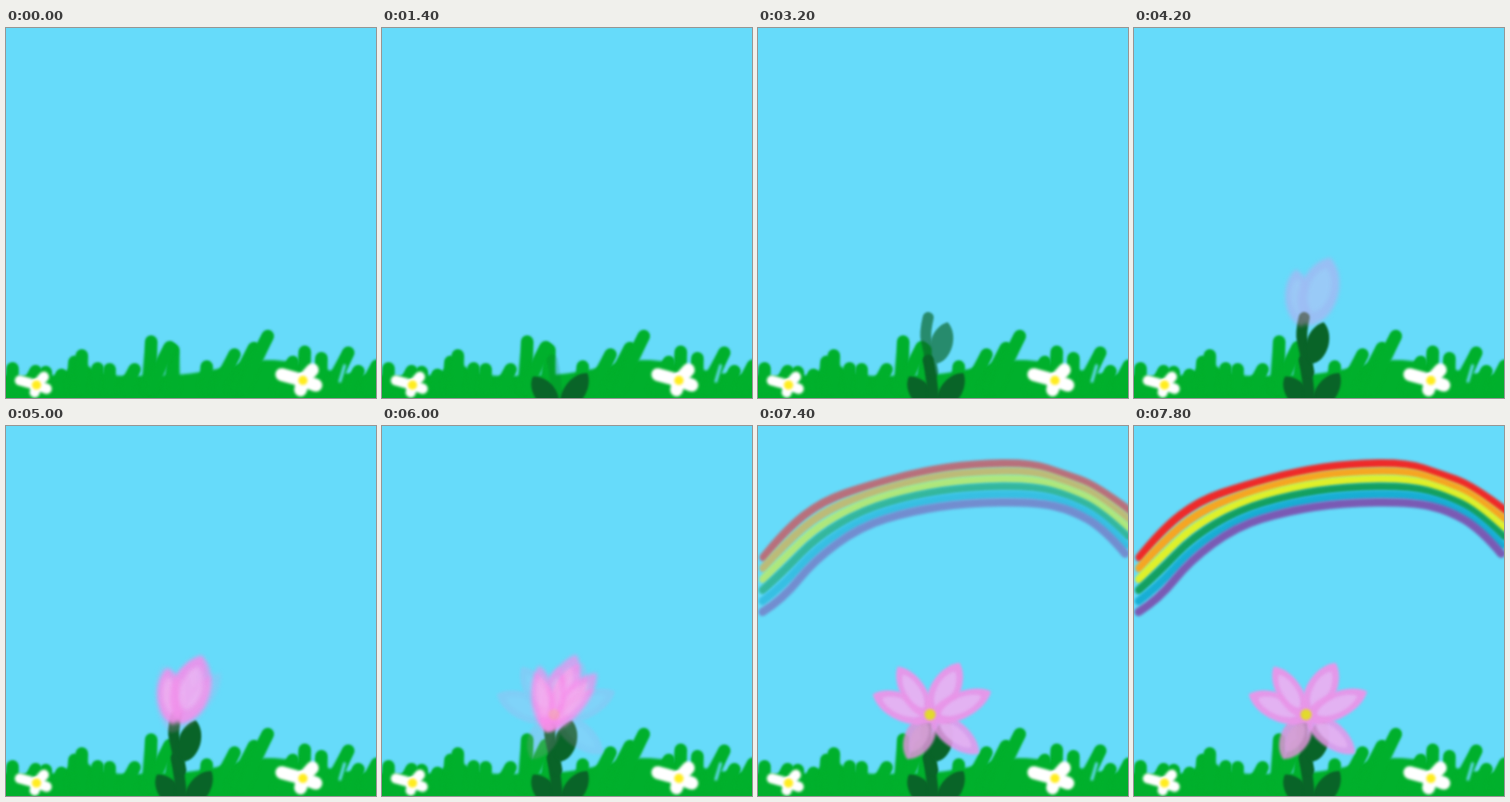
An HTML page with a canvas for the animation above (8000 ms loop, 400 px wide and 400 px high).

```html
<!DOCTYPE html>
<html lang="en">
<head>
<meta charset="utf-8">
<title>Growing flower</title>
<style>
  html, body { margin: 0; width: 100%; height: 100%; overflow: hidden; background: #66dbfa; }
  canvas { display: block; width: 100vw; height: 100vh; }
</style>
</head>
<body>
<canvas id="stage" width="400" height="400"></canvas>
<script>
const SIZE = 400, LOOP = 8000, STEP = 200;
const SKY = '#66dbfa', GRASS = '#00b02c', DARK = '#096428';
const PINK = '#e996e9', PALE = '#e4b3f3';
const ctx = document.getElementById('stage').getContext('2d');

// A transparent layer painted once with a soft brush.
function layer(paint, blur = 1.7) {
  const canvas = document.createElement('canvas');
  canvas.width = canvas.height = SIZE;
  const g = canvas.getContext('2d');
  g.filter = `blur(${blur}px)`;
  g.lineCap = g.lineJoin = 'round';
  paint(g);
  return canvas;
}

const lerp = (a, b, k) => a + (b - a) * k;
const mix = (a, b, k) => [lerp(a[0], b[0], k), lerp(a[1], b[1], k)];
const bell = (x, center, spread) => Math.exp(-(((x - center) / spread) ** 2));

// A smooth stroke guided by its points.
function brush(g, color, width, points) {
  const last = points.length - 1;
  g.beginPath();
  g.moveTo(...points[0]);
  for (let i = 1; i < last; i++) {
    g.quadraticCurveTo(...points[i], ...mix(points[i], points[i + 1], i === last - 1 ? 1 : 0.5));
  }
  g.lineTo(...points[last]);
  g.strokeStyle = color;
  g.lineWidth = width;
  g.stroke();
}

function dot(g, color, x, y, r) {
  g.beginPath();
  g.arc(x, y, r, 0, Math.PI * 2);
  g.fillStyle = color;
  g.fill();
}

// A leaf from root to tip, widest past its middle.
function leaf(g, color, root, tip, width) {
  const dx = tip[0] - root[0], dy = tip[1] - root[1];
  const swell = width * 2 / 3 / Math.hypot(dx, dy);
  const side = (k, s) => [root[0] + dx * k - dy * s, root[1] + dy * k + dx * s];
  g.beginPath();
  g.moveTo(...root);
  g.bezierCurveTo(...side(0.15, swell), ...side(0.8, swell), ...tip);
  g.bezierCurveTo(...side(0.8, -swell), ...side(0.15, -swell), ...root);
  g.fillStyle = color;
  g.fill();
}

function petal(g, root, tip, width, rim = PINK, heart = PALE) {
  leaf(g, rim, root, tip, width);
  leaf(g, heart, mix(root, tip, 0.2), mix(root, tip, 0.84), width * 0.55);
}

function blade(g, x, y, lean) {
  const root = x - (390 - y) * lean;
  for (const side of [-3, 3]) brush(g, GRASS, 12, [[root + side, 390], [x, y]]);
}

function daisy(g, x, y, scale) {
  for (const [dx, dy] of [[-18, -5], [8, -9], [11, 4], [-2, 8]]) {
    brush(g, '#fff', 11 * scale, [[x, y], [x + dx * scale, y + dy * scale]]);
  }
  dot(g, '#ffec1e', x, y, 5);
}

const meadow = layer(g => {
  g.fillStyle = SKY;
  g.fillRect(-20, -20, 440, 440);

  g.beginPath();
  g.moveTo(-20, 420);
  for (let x = -20; x <= 420; x += 5) {
    g.lineTo(x, 376 - 17 * bell(x, 285, 62) - 12 * bell(x, 82, 18));
  }
  g.lineTo(420, 420);
  g.fillStyle = GRASS;
  g.fill();

  const upright = [[7, 368], [43, 372], [60, 375], [74, 361], [82, 354], [99, 368], [112, 369],
    [157, 339], [181, 348], [217, 366], [323, 350], [341, 357]];
  const leaning = [[32, 371], [139, 369], [177, 345], [247, 353], [268, 346], [283, 333],
    [310, 361], [370, 351], [381, 371], [401, 365]];
  for (const [x, y] of upright) blade(g, x, y, 0.04);
  for (const [x, y] of leaning) blade(g, x, y, 0.5);

  brush(g, SKY, 3, [[366, 365], [361, 382]]);
  daisy(g, 33, 386, 1);
  daisy(g, 321, 381, 1.27);
});

const leaves = layer(g => {
  leaf(g, DARK, [189, 412], [163, 377], 23);
  leaf(g, DARK, [195, 412], [222, 373], 23);
}, 1.2);

const stem = layer(g => brush(g, DARK, 12, [[190, 405], [188, 378], [184, 359]]), 1.3);

const stalk = layer(g => {
  brush(g, DARK, 12, [[189, 372], [184, 345], [180, 330], [184, 313]]);
  leaf(g, DARK, [192, 363], [205, 318], 24);
}, 1.3);

const bud = layer(g => {
  g.globalAlpha = 0.92;
  petal(g, [181, 323], [175, 261], 29, '#ee91eb', '#ecb0f1');
  petal(g, [188, 322], [212, 248], 42, '#ee91eb', '#e6b5f3');
}, 2);

const tulip = layer(g => {
  g.globalAlpha = 0.85;
  for (const [x, y, width] of [[210, 247, 34], [232, 267, 28], [192, 260, 26], [170, 259, 25]]) {
    petal(g, [178, 330], [x, y], width, '#fb8bea', '#f5aeee');
  }
}, 2);

const bloom = layer(g => {
  g.globalAlpha = 0.86;
  petal(g, [188, 312], [161, 360], 31, '#dc93d8', '#d6a0d6');
  petal(g, [186, 312], [239, 354], 28);
  g.globalAlpha = 0.97;
  dot(g, PINK, 186, 312, 8);
  petal(g, [189, 318], [124, 290], 30);
  petal(g, [186, 316], [151, 260], 27);
  petal(g, [186, 316], [218, 256], 32);
  petal(g, [184, 318], [252, 287], 29);
  dot(g, '#e1dc26', 186, 312, 6);
}, 1.8);

// The bands lie evenly between an outer and an inner arc.
const rainbow = layer(g => {
  const outer = [[6, 142], [30, 112], [70, 81], [120, 64], [178, 49], [232, 41], [295, 40], [330, 52], [365, 64], [402, 92]];
  const inner = [[5, 201], [27, 187], [60, 146], [110, 109], [165, 92], [225, 83], [300, 82], [340, 91], [375, 112], [397, 138]];
  const colors = ['#ee2a2a', '#f5a623', '#dff02a', '#14a060', '#18aed4', '#7a5ab4'];
  colors.forEach((color, i) => {
    brush(g, color, 9, outer.map((p, n) => mix(p, inner[n], i / 5)));
  });
}, 1.8);

// Added weights keep the cross-fade between blossoms even.
const blossom = layer(g => {
  g.filter = 'none';
  g.globalCompositeOperation = 'lighter';
});
const blossomCtx = blossom.getContext('2d');

// Opacity after the step at time t, for a fade of so many steps.
const fade = (t, start, steps = 5) => Math.max(0, Math.min(1, ((t - start) / STEP + 1) / steps));

function draw(g, image, alpha) {
  g.globalAlpha = alpha;
  g.drawImage(image, 0, 0);
}

function render(now) {
  const t = Math.floor((now % LOOP) / STEP) * STEP;
  const toBud = fade(t, 4000), toTulip = fade(t, 5000), toBloom = fade(t, 6000);

  draw(ctx, meadow, 1);
  draw(ctx, leaves, fade(t, 400));
  draw(ctx, stem, fade(t, 1400, 6));
  draw(ctx, stalk, fade(t, 2600, 6));

  blossomCtx.clearRect(0, 0, SIZE, SIZE);
  draw(blossomCtx, bud, toBud - toTulip);
  draw(blossomCtx, tulip, toTulip - toBloom);
  draw(blossomCtx, bloom, toBloom);
  draw(ctx, blossom, 1);

  draw(ctx, rainbow, fade(t, 7000));
}

const begin = performance.now();
function tick() {
  render(performance.now() - begin);
  requestAnimationFrame(tick);
}
tick();
</script>
</body>
</html>
```
